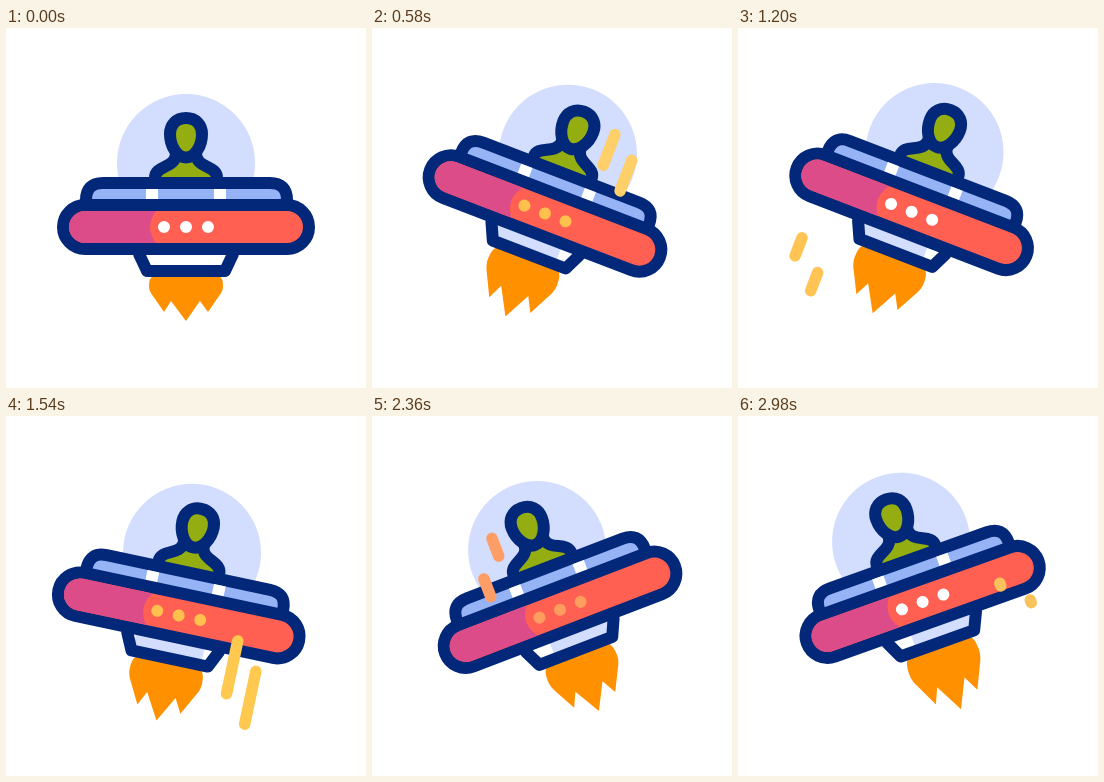
An HTML page for the animation above (3 s loop, 360 by 360 pixels).

```html
<!DOCTYPE html>
<html lang="en">
<head>
<meta charset="utf-8">
<title>Flying saucer</title>
<style>
html, body { margin: 0; width: 100%; height: 100%; overflow: hidden; background: #fff; }
svg { display: block; width: 100vw; height: 100vh; }
.line { stroke: #03287a; stroke-width: 12; stroke-linejoin: round; stroke-linecap: round; }
#streaks path { stroke-width: 11.5; stroke-linecap: round; }
</style>
</head>
<body>
<svg viewBox="0 0 360 360">
  <clipPath id="skirt"><path d="M133 226L141 243H219L227 226Z"/></clipPath>
  <g id="tilt">
    <g id="ship">
      <path id="flame" fill="#ff9100" d="M147 0H213Q217 2 217 10Q217 15 213 20L202 36L194 25L180 45L165 25L158 36L147 20Q143 15 143 10Q143 2 147 0Z"/>
      <circle cx="180" cy="135" r="69" fill="#d3ddfd"/>
      <g class="line" fill="#94ad10">
        <path d="M149 158V150C149 137 169 141 170 126H190C191 141 211 137 211 150V158"/>
        <path d="M180 90C190 90 196 97 196 106C196 118 189 129.500 180 129.500C171 129.500 164 118 164 106C164 97 170 90 180 90Z"/>
      </g>
      <path d="M133 226L141 243H219L227 226Z" fill="#fff"/>
      <g clip-path="url(#skirt)"><rect id="shade" x="148" y="226" width="70" height="17" fill="#d3ddfd"/></g>
      <path class="line" d="M133 226L141 243H219L227 226" fill="none"/>
      <path class="line" d="M80 178V172Q80 155 97 155H264Q281 155 281 172V178" fill="#96b3f5"/>
      <path d="M140 161h12v12h-12zM208 161h12v12h-12z" fill="#fff"/>
      <rect class="line" x="57" y="177" width="246" height="44" rx="22" fill="#ff6052"/>
      <path d="M79 183H150Q138 199 150 215H79A16 16 0 0 1 79 183Z" fill="#dc4c88"/>
      <g id="dots">
        <circle cx="158" cy="199" r="6"/><circle cx="180" cy="199" r="6"/><circle cx="202" cy="199" r="6"/>
      </g>
    </g>
    <g id="streaks" transform="translate(180 170)"></g>
  </g>
</svg>
<script>
const LOOP = 3000, BEAT = 850;
const $ = id => document.getElementById(id);
const clamp = v => Math.max(0, Math.min(1, v));
const sine = p => (1 - Math.cos(Math.PI * p)) / 2;
const linear = p => p;

// [time, value] keys
const ANGLE = [[0, 0], [500, 21], [1288, 21], [2112, -21], [2900, -21], [3400, 0]];
const LIFT = [[0, 0], [480, 14], [880, 1], [1230, 14], [1590, -2], [2090, 11.5], [2540, 0], [2960, 12.5], [3400, 0]];
const FLAME = [[0, 1], [0.36, 1.26], [0.51, 1.45], [0.8, 1.31], [1, 1.14]];

// Streak pairs in the tilted frame: second line is offset by dx, dy
const PAIRS = [
  { x: 36, y: -119, len: 70, dx: 25, dy: 18, start: 210, dur: 500, color: '#ffcf6a' },
  { x: -94, y: 28, len: 70, dx: 27, dy: 27, start: 777, dur: 500, color: '#ffc454' },
  { x: 62, y: 38, len: 66, dx: 24, dy: 26, start: 1295, dur: 500, color: '#ffc84f' },
  { x: -39, y: -113, len: 66, dx: -22, dy: 35, start: 1915, dur: 530, color: '#d0c66e' },
  { x: 78, y: 25, len: 70, dx: 23, dy: 26, start: 2970, dur: 500, color: '#f9c25c' }
];
for (const pair of PAIRS) {
  pair.el = document.createElementNS('http://www.w3.org/2000/svg', 'path');
  $('streaks').append(pair.el);
}

function track(keys, t, ease) {
  const i = Math.max(1, keys.findIndex(k => k[0] >= t));
  const [t0, a] = keys[i - 1], [t1, b] = keys[i];
  return a + (b - a) * ease((t - t0) / (t1 - t0));
}

function drawPair(pair, t) {
  const p = (t - pair.start) / pair.dur;
  const on = p > 0 && p < 1;
  pair.el.style.display = on ? '' : 'none';
  if (!on) return;
  const head = pair.y + pair.len * clamp(p / 0.55);
  const tail = pair.y + pair.len * clamp((p - 0.45) / 0.55);
  pair.el.setAttribute('d', `M${pair.x} ${tail}V${head}M${pair.x + pair.dx} ${tail + pair.dy}V${head + pair.dy}`);
  pair.el.setAttribute('stroke', t > 2180 && t < 2700 ? '#ff9d66' : pair.color);
}

function draw(t) {
  const phase = t % BEAT / BEAT;
  const settle = clamp(t / 300);
  const angle = track(ANGLE, t, sine);
  $('tilt').setAttribute('transform', `rotate(${angle} 180 170)`);
  // Slight drift to the left once under way
  $('ship').setAttribute('transform', `translate(${-settle} ${-track(LIFT, t, sine)})`);
  $('flame').setAttribute('transform', `translate(0 248) scale(1 ${track(FLAME, phase, linear)})`);
  $('shade').setAttribute('transform', `translate(${-angle * 0.5} 0)`);
  $('shade').setAttribute('opacity', settle);
  $('dots').setAttribute('fill', phase < 0.51 ? '#fff' : t > 2180 ? '#ff9d5e' : '#ffc04e');
  PAIRS.forEach(pair => drawPair(pair, t));
}

const begin = performance.now();
function tick() {
  draw((performance.now() - begin) % LOOP);
  requestAnimationFrame(tick);
}
draw(0);
requestAnimationFrame(tick);
</script>
</body>
</html>
```
